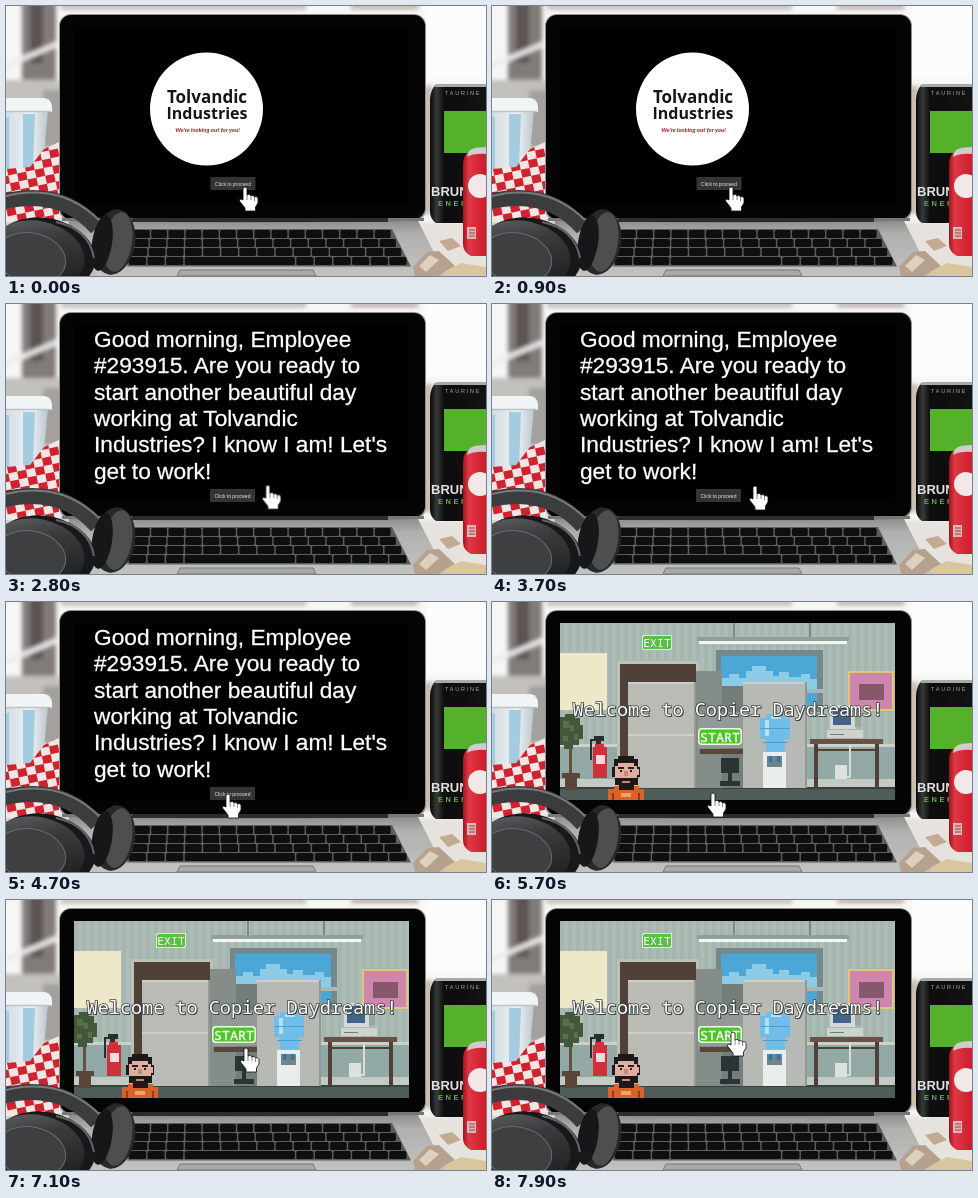
Recreate the animation shown at these times as an HTML page. Size 480x270 px, loop 8000 ms.

```html
<!DOCTYPE html>
<html lang="en">
<head>
<meta charset="utf-8">
<title>Desk</title>
<style>
html, body { margin: 0; width: 100%; height: 100%; overflow: hidden; background: #eee; }
svg { display: block; width: 100vw; height: 100vh; }
text { white-space: pre; }
.ui { font-family: "Liberation Sans", Arial, sans-serif; }
.bold { font-family: "Open Sans", sans-serif; font-weight: 700; }
.mono { font-family: "Noto Sans Mono", monospace; font-weight: 500; fill: #fff; }
.pixel { shape-rendering: crispEdges; }
#intro { animation: intro 8s step-end infinite; }
#greet { animation: greet 8s step-end infinite; }
#office { animation: office 8s step-end infinite; }
#hand { animation: hand 8s ease-in-out infinite; }
@keyframes intro { 0% { visibility: visible } 12.5%, 100% { visibility: hidden } }
@keyframes greet { 0% { visibility: hidden } 12.5% { visibility: visible } 65%, 100% { visibility: hidden } }
@keyframes office { 0% { visibility: hidden } 65%, 100% { visibility: visible } }
@keyframes hand {
  0%, 12.5% { transform: translate(239px, 181px) }
  21%, 24% { transform: translate(260px, 180px) }
  44%, 50% { transform: translate(263px, 182px) }
  58%, 60% { transform: translate(222px, 192px) }
  65%, 74% { transform: translate(221px, 191px) }
  86%, 89% { transform: translate(240px, 148px) }
  97%, 100% { transform: translate(241px, 132px) }
}
</style>
</head>
<body>
<svg viewBox="0 0 480 270" preserveAspectRatio="none">
<defs>
  <filter id="blur" x="-30%" y="-30%" width="160%" height="160%"><feGaussianBlur stdDeviation="2"/></filter>
  <linearGradient id="deck" x2="0" y2="1">
    <stop offset="0" stop-color="#858583"/><stop offset=".3" stop-color="#b0b0ae"/>
    <stop offset="1" stop-color="#c2c2c0"/>
  </linearGradient>
  <linearGradient id="cup">
    <stop offset="0" stop-color="#d5dde1"/><stop offset=".6" stop-color="#edf1f2"/>
    <stop offset="1" stop-color="#b9c6cd"/>
  </linearGradient>
  <linearGradient id="black">
    <stop offset="0" stop-color="#080808"/><stop offset=".12" stop-color="#383a3a"/>
    <stop offset=".25" stop-color="#0c0d0c"/><stop offset="1" stop-color="#111211"/>
  </linearGradient>
  <linearGradient id="red">
    <stop offset="0" stop-color="#a41320"/><stop offset=".25" stop-color="#e03846"/>
    <stop offset="1" stop-color="#cc1c2b"/>
  </linearGradient>
  <linearGradient id="shell" x2=".6" y2="1">
    <stop offset="0" stop-color="#66686a"/><stop offset=".4" stop-color="#3a3c3e"/>
    <stop offset="1" stop-color="#1e1f21"/>
  </linearGradient>
  <clipPath id="paper"><path d="M0 163 L24 161 L38 143 L53 136 V216 H0Z"/></clipPath>
  <clipPath id="view"><rect x="68" y="21" width="335" height="177"/></clipPath>
  <g id="button">
    <rect width="45" height="13" fill="#343434"/>
    <text class="ui" x="22.5" y="8.5" font-size="5" text-anchor="middle" fill="#e5e5e5">Click to proceed</text>
  </g>
</defs>

<!-- room -->
<rect width="480" height="270" fill="#f6f6f5"/>
<g filter="url(#blur)">
  <rect x="16" y="-5" width="34" height="84" fill="#827c79"/>
  <rect x="24" y="-5" width="13" height="62" fill="#5b5553"/>
  <rect x="-5" y="74" width="62" height="66" fill="#c3c1be"/>
  <rect x="37" y="84" width="20" height="58" fill="#a3a09d"/>
  <path d="M-3 61 L56 36" stroke="#ececeb" stroke-width="5"/>
  <path d="M55 1 H300" stroke="#bdb9b6" stroke-width="5"/>
  <path d="M345 1 H412" stroke="#b3a49c" stroke-width="4"/>
  <rect x="420" y="-5" width="65" height="78" fill="#fcfcfc"/>
  <rect x="415" y="80" width="12" height="128" fill="#c9bdb1"/>
  <rect x="410" y="216" width="80" height="60" fill="#e6e3de"/>
  <rect x="-5" y="212" width="70" height="60" fill="#d6d4d1"/>
</g>

<!-- cup and checked paper -->
<path d="M0 104 H42 L36 166 H0Z" fill="url(#cup)"/>
<path d="M0 111 H3 V163 H0Z M17 108 H29 L27 163 H17Z" fill="#a5cbe0"/>
<path d="M0 92 H39 Q46 94 46 101 V106 H0Z" fill="#f1f4f5"/>
<path d="M0 105.5 H45" stroke="#b8c2c9" stroke-width="1.5"/>
<g clip-path="url(#paper)">
  <rect y="130" width="56" height="90" fill="#f1e6e3"/>
  <g id="checks" fill="#cf2430" transform="rotate(-12 25 180)"></g>
</g>

<!-- laptop -->
<path d="M63 211 H410 L440 270 H60Z" fill="url(#deck)"/>
<path d="M128 223 H386 L405 260.500 H121Z" fill="#5d5d5c"/>
<g id="keys" fill="#0e0f0f"></g>
<path d="M171 270 L174 264 H307 L310 270Z" fill="#a9a9a7" stroke="#777"/>
<rect x="53" y="8" width="367" height="207" rx="12" fill="#8f9193"/>
<rect x="54" y="9" width="365" height="204" rx="11" fill="#040404"/>
<path d="M56 212 H418 V215 Q237 218 56 215Z" fill="#777876"/>
<rect x="126" y="212" width="256" height="4" fill="#2c2d2d"/>

<!-- opening screen -->
<g id="intro">
  <rect x="68" y="21" width="335" height="177" fill="#000"/>
  <circle cx="200.5" cy="103" r="56.5" fill="#fff"/>
  <g class="bold" fill="#161616" text-anchor="middle">
    <text x="201" y="97" font-size="17">Tolvandic</text>
    <text x="201" y="113" font-size="16">Industries</text>
  </g>
  <text x="201.5" y="126" font-family="Lato, sans-serif" font-size="6" font-style="italic"
    font-weight="700" fill="#b9111b" text-anchor="middle">We're looking out for you!</text>
  <use href="#button" x="204.5" y="171"/>
</g>

<!-- greeting -->
<g id="greet">
  <rect x="68" y="21" width="335" height="177" fill="#000"/>
  <g id="lines" class="ui" font-size="22.7" fill="#fff" stroke="#fff" stroke-width=".3"></g>
  <use href="#button" x="204" y="185"/>
</g>

<!-- office -->
<g id="office" clip-path="url(#view)">
  <g class="pixel">
    <rect x="68" y="21" width="335" height="177" fill="#adbdb6"/>
    <g id="stripes" fill="#a5b5af"></g>
    <rect x="68" y="144" width="335" height="34" fill="#93a9a5"/>
    <rect x="68" y="142" width="335" height="3" fill="#c9d1ca"/>
    <rect x="68" y="177" width="335" height="9" fill="#c3cac3"/>
    <rect x="68" y="186" width="335" height="12" fill="#4f5d5a"/>
    <rect x="68" y="185" width="335" height="2" fill="#36423f"/>
    <rect x="68" y="51" width="47" height="57" fill="#ede9c8"/>
    <!-- door and exit sign -->
    <rect x="125" y="59" width="82" height="127" fill="#bcc0b9"/>
    <rect x="128" y="62" width="76" height="124" fill="#4f4038"/>
    <rect x="150" y="33" width="30" height="15" rx="2" fill="#d5efca"/>
    <rect x="151" y="34" width="28" height="13" rx="2" fill="#59c043"/>
    <!-- lamp and window -->
    <path d="M242 21 V36 M318 21 V36" stroke="#7c8985" stroke-width="2"/>
    <rect x="205" y="35" width="152" height="4" fill="#929e99"/>
    <rect x="207" y="39" width="148" height="3" fill="#f3f6f2"/>
    <rect x="224" y="48" width="107" height="62" fill="#75888b"/>
    <rect x="229" y="54" width="96" height="50" fill="#4ca6d6"/>
    <path d="M229 76 H237 V72 H247 V76 H254 V69 H260 V64 H274 V69 H281 V74 H287 V70 H297 V75 H309 V72 H318 V77 H325 V90 H229Z" fill="#8bcbe5"/>
    <rect x="224" y="87" width="107" height="4" fill="#a9b8b7"/>
    <!-- cubicles -->
    <rect x="204" y="69" width="26" height="117" fill="#858d89"/>
    <rect x="230" y="84" width="23" height="102" fill="#737d7a"/>
    <rect x="206" y="110" width="45" height="36" fill="#919a96"/>
    <rect x="208" y="147" width="43" height="5" fill="#57483e"/>
    <rect x="136" y="80" width="68" height="106" fill="#b9bbb4"/>
    <path d="M136 81 H204 M136 133 H204" stroke="#cdd0c9" stroke-width="2"/>
    <path d="M203 80 V186" stroke="#939994" stroke-width="2"/>
    <rect x="251" y="80" width="64" height="106" fill="#b7bab4"/>
    <path d="M251 81 H315" stroke="#cdd0c9" stroke-width="2"/>
    <path d="M314 80 V186" stroke="#929995" stroke-width="2"/>
    <path d="M229 156 H247 V171 H240 V179 H248 V184 H228 V179 H236 V171 H229Z" fill="#2c3334"/>
    <!-- water cooler -->
    <path d="M274 112 H293 V116 H298 V137 H293 V150 H274 V137 H268 V116 H274Z" fill="#6fbde8"/>
    <path d="M273 118 H277 V134 H273Z M279 114 H289 V117 H279Z" fill="#b3e0f5"/>
    <path d="M268 126 H298 M271 140 H296" stroke="#4d9fd0"/>
    <rect x="271" y="150" width="23" height="36" fill="#e9edeb"/>
    <rect x="275" y="154" width="15" height="11" fill="#70828a"/>
    <rect x="277" y="154" width="3" height="6" fill="#2f76a8"/>
    <rect x="285" y="154" width="3" height="6" fill="#2f76a8"/>
    <!-- picture -->
    <rect x="356" y="69" width="46" height="40" fill="#dfc679"/>
    <rect x="358" y="71" width="42" height="36" fill="#cf86ad"/>
    <rect x="367" y="82" width="25" height="16" fill="#87586b"/>
    <!-- desk and computer -->
    <rect x="338" y="103" width="25" height="24" fill="#d5d9d2"/>
    <rect x="341" y="106" width="18" height="17" fill="#41658a"/>
    <path d="M363 105 H369 V125 H363Z" fill="#9ba6a3"/>
    <rect x="335" y="128" width="36" height="8" fill="#ced3cd"/>
    <path d="M338 132 H352" stroke="#727f7d"/>
    <rect x="318" y="137" width="73" height="5" fill="#6a5045"/>
    <path d="M322 142 H326 V186 H322Z M383 142 H387 V186 H383Z M326 147 H383 V149 H326Z" fill="#514038"/>
    <path d="M358 143 V175 H351" fill="none" stroke="#d7ddd9" stroke-width="2"/>
    <rect x="343" y="163" width="12" height="14" fill="#dde1dd"/>
    <!-- plant -->
    <path d="M77 140 H80 V174 H77Z" fill="#66513e"/>
    <path d="M68 115 H73 V112 H83 V116 H88 V123 H91 V137 H87 V143 H81 V147 H72 V143 H68Z" fill="#42573c"/>
    <path d="M71 119 H77 V123 H82 V129 H78 V126 H71Z M82 132 H86 V138 H82Z M71 134 H76 V139 H71Z" fill="#5a7148"/>
    <path d="M70 171 H88 V176 H85 V188 H73 V176 H70Z" fill="#594638"/>
    <!-- extinguisher -->
    <path d="M102 134 H112 V139 H109 V143 H104 V139 H102Z" fill="#2b2e2e"/>
    <path d="M103 138 H99 V158" fill="none" stroke="#2b2e2e" stroke-width="2"/>
    <path d="M103 142 H112 V145 H115 V176 H101 V145 H103Z" fill="#cf3039"/>
    <rect x="104" y="153" width="9" height="9" fill="#eadfda"/>
    <!-- worker -->
    <path d="M122 184 H147 V187 H152 V198 H116 V187 H122Z" fill="#d9622a"/>
    <path d="M126 154 H142 V157 H146 V165 H148 V175 H146 V183 H142 V188 H127 V183 H123 V175 H120 V165 H122 V157 H126Z" fill="#1e1919"/>
    <path d="M126 161 H142 V164 H145 V173 H147 V167 H145 V176 H123 V164 H126Z" fill="#ddaea1"/>
    <path d="M126 165 H132 V167 H126Z M136 165 H142 V167 H136Z M128 168 H130 V170 H128Z M138 168 H140 V170 H138Z" fill="#291e1b"/>
    <path d="M132 169 H136 V174 H132Z M130 179 H138 V181 H130Z" fill="#c4877b"/>
    <path d="M129 191 H139 V195 H129Z" fill="#f0a463"/>
    <path d="M121 191 V198 M147 191 V198" stroke="#8e3d1b" stroke-width="2"/>
  </g>
  <rect x="206" y="126" width="44" height="17" rx="4" fill="#eefae5"/>
  <rect x="207.500" y="127.500" width="41" height="14" rx="3" fill="#4fc529"/>
  <g class="mono" text-anchor="middle">
    <text x="165" y="45" font-size="11.5">EXIT</text>
    <text x="228" y="139.5" font-size="13.4" stroke="#fff" stroke-width=".3">START</text>
    <text x="237" y="115" font-size="18.5" fill="#303735">Welcome to Copier Daydreams!</text>
    <text x="236" y="114" font-size="18.5" stroke="#3f4643" stroke-width="1.6" paint-order="stroke">Welcome to Copier Daydreams!</text>
  </g>
</g>

<!-- headphones -->
<path d="M-4 196 Q55 181 91 222" fill="none" stroke="#3a3c3e" stroke-width="16"/>
<path d="M-4 191 Q55 175 95 216" fill="none" stroke="#77797b" stroke-width="2"/>
<ellipse cx="108" cy="236" rx="21" ry="33" fill="#26282a" transform="rotate(9 108 236)"/>
<ellipse cx="112" cy="236" rx="14" ry="30" fill="#4c4e50" transform="rotate(9 112 236)"/>
<ellipse cx="96" cy="237" rx="10" ry="28" fill="#161718" transform="rotate(9 96 237)"/>
<ellipse cx="39" cy="248" rx="51" ry="36" fill="#17181a" transform="rotate(12 39 248)"/>
<ellipse cx="31" cy="249" rx="48" ry="34" fill="url(#shell)" transform="rotate(12 31 249)"/>
<ellipse cx="25" cy="252" rx="35" ry="25" fill="#3d3f41" stroke="#696c6e" transform="rotate(12 25 252)"/>
<path d="M50 216 Q83 223 88 252" fill="none" stroke="#606467" stroke-width="2"/>

<!-- cans and crumbs -->
<path d="M429 79 H480 V217 H430 Q424 213 424 205 V94 Q424 86 429 79Z" fill="url(#black)"/>
<path d="M430 78 H480 V81 H428Z" fill="#a8aaab"/>
<text class="ui" x="439" y="89" font-size="5.5" letter-spacing="1.8" fill="#a9acaa">TAURINE</text>
<rect x="438" y="105" width="42" height="42" fill="#55b02b"/>
<g class="ui" font-weight="700">
  <text x="425" y="190" font-size="13" fill="#e2e3e1">BRUND</text>
  <text x="432" y="200" font-size="7.5" letter-spacing="2.5" fill="#6caa3b">ENERGY</text>
</g>
<path d="M463 145 H480 V250 H465 Q457 246 457 238 V158 Q457 150 463 145Z" fill="url(#red)"/>
<path d="M462 147 Q464 141 480 141 V148 Q468 147 461 151Z" fill="#cdcdcd"/>
<circle cx="474" cy="180" r="12" fill="#f1e8e7"/>
<path d="M461 221 H470 V233 H461Z" fill="#dcb5b4"/>
<path d="M463 224 H469 M463 227 H469 M463 230 H469" stroke="#a83c42"/>
<path d="M407 261 L421 246 L433 245 L449 260 L432 270 H409Z" fill="#b5a18d"/>
<path d="M413 260 L424 249 L433 254 L420 266Z" fill="#ddd0bf"/>
<path d="M433 235 L446 232 L455 240 L442 245Z" fill="#c3ab92"/>
<path d="M438 266 L455 257 L480 261 V270 H438Z" fill="#d8c69f"/>

<!-- pointer -->
<g id="hand">
  <path d="M-2 1 Q0 -1 2 1 V8 Q5 6 6 9 Q8 7 9.500 10 Q12 8.500 13 11.500 V16 L10.500 20 V24 H0 V21 L-5.500 14 Q-6 11 -2 13Z"
    fill="#fff" stroke="#111" stroke-width=".8" stroke-linejoin="round"/>
  <path d="M2 8 V13 M6 9 V13 M9.500 10 V14" stroke="#555" stroke-width=".7"/>
</g>
</svg>
<script>
const make = (parent, tag, attrs, label = "") => {
  const el = document.createElementNS("http://www.w3.org/2000/svg", tag);
  for (const name in attrs) el.setAttribute(name, attrs[name]);
  el.textContent = label;
  document.getElementById(parent).append(el);
};
const box = (parent, x, y, width, height, rx = 0) =>
  make(parent, "rect", { x, y, width, height, rx });

const greeting = [
  "Good morning, Employee", "#293915. Are you ready to", "start another beautiful day",
  "working at Tolvandic", "Industries? I know I am! Let's", "get to work!"
];
greeting.forEach((line, i) => make("lines", "text", { x: 88, y: 43 + i * 26.3 }, line));

for (let x = 68; x < 403; x += 8) box("stripes", x, 21, 4, 121);

for (let row = 0; row < 14; row++)
  for (let col = 0; col < 7; col++)
    if ((row + col) % 2) box("checks", col * 9 - 4, 125 + row * 8, 9, 8);

// Keys widen towards the viewer.
for (let row = 0; row < 4; row++) {
  const y = 224 + row * 9;
  const left = 128 - row * 1.7;
  const step = (258 + row * 7) / 15;
  for (let col = 0; col < 15; col++) {
    if (row === 3 && col > 2 && col < 9) continue;
    box("keys", left + col * step, y, step - 1.4, 8, 1.5);
  }
  if (row === 3) box("keys", left + 3 * step, y, 6 * step - 1.4, 8, 1.5);
}
</script>
</body>
</html>
```
